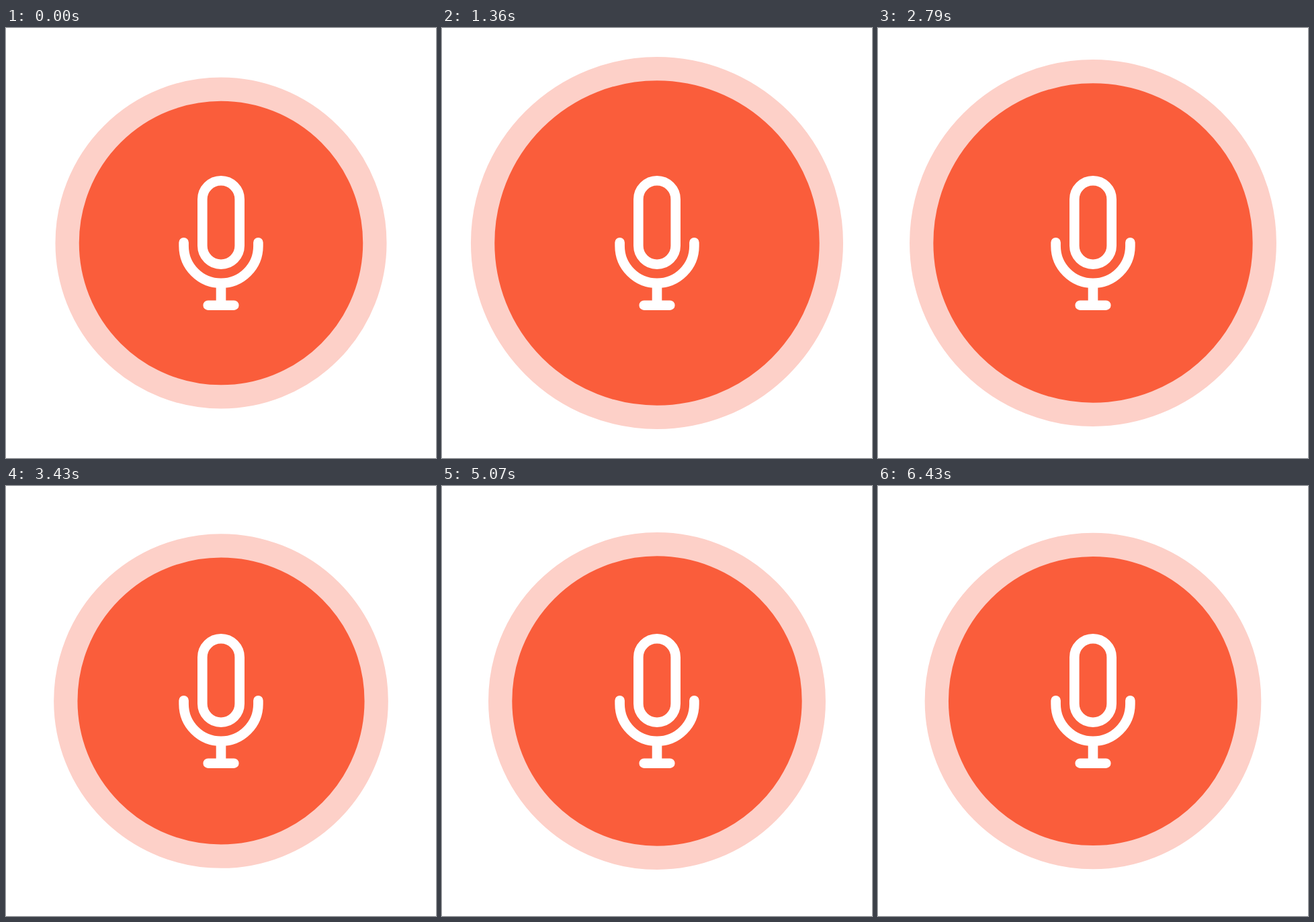
Animation of 640 by 640 pixels, one loop 6.93 s. Source, as an HTML page without scripts:

```html
<!DOCTYPE html>
<html lang="en">
<head>
<meta charset="utf-8">
<title>Microphone pulse</title>
<style>
  html, body { margin: 0; width: 100%; height: 100%; overflow: hidden; background: #fff; }
  svg { display: block; width: 100%; height: 100%; }

  /* The stroke is the pale halo; its width stays constant while the radius follows the voice level. */
  .level {
    fill: #fa5d3b;
    stroke: #fdd0c8;
    stroke-width: 35.3px;
    r: 228.9px;
    animation: level 6930ms cubic-bezier(.37, 0, .63, 1) infinite;
  }
  .mic {
    fill: none;
    stroke: #fff;
    stroke-width: 14.6px;
    stroke-linecap: round;
  }

  @keyframes level {
    0%, 1.44%    { r: 228.9px; }
    5.19%        { r: 266.4px; }
    8.95%        { r: 233px; }
    12.41%       { r: 252px; }
    16.02%       { r: 232px; }
    19.62%       { r: 259.4px; }
    24.39%       { r: 232px; }
    29.29%       { r: 252.4px; }
    34.2%        { r: 232px; }
    38.93%       { r: 261.4px; }
    43.29%       { r: 233px; }
    46.32%       { r: 250.4px; }
    49.49%       { r: 231.2px; }
    53.1%        { r: 248px; }
    57%          { r: 232px; }
    61.18%       { r: 269.4px; }
    65.51%       { r: 231.4px; }
    69.7%        { r: 256.4px; }
    74.03%       { r: 231px; }
    79.37%       { r: 246.4px; }
    84.56%       { r: 231.2px; }
    88.74%       { r: 258.4px; }
    92.78%, 100% { r: 232.7px; }
  }
</style>
</head>
<body>
<svg viewBox="0 0 640 640">
  <circle class="level" cx="320" cy="320"/>
  <g class="mic">
    <rect x="292.3" y="227.3" width="55.4" height="124.5" rx="27.7"/>
    <path d="M264.6 319.2v5.2a55.4 55.4 0 0 0 110.8 0v-5.2M320 380v32.7M300.7 412.7h38.6"/>
  </g>
</svg>
</body>
</html>
```
